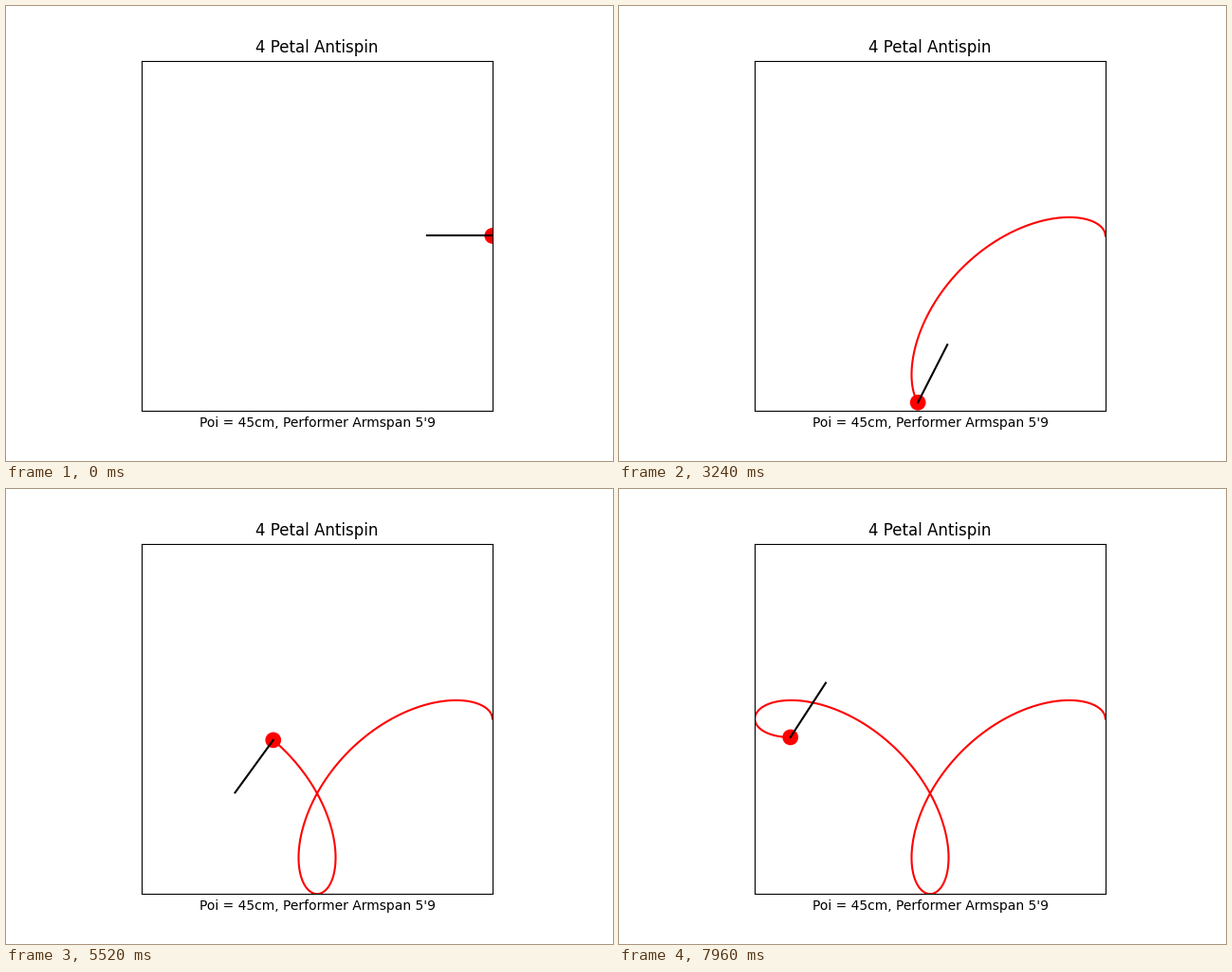
Recreate the animation shown at these times as a matplotlib script. Size 640 px wide and 480 px high, loop 8000 ms.

```python
import numpy as np
import matplotlib.pyplot as plt
from matplotlib.animation import FuncAnimation

ARM = 76.5       # hand circle radius, cm
POI = 45         # tether length, cm
REACH = ARM + POI
FRAMES = 200     # one degree of arm rotation per frame

theta = np.radians(np.arange(FRAMES))
hand_x, hand_y = ARM * np.cos(theta), -ARM * np.sin(theta)
head_x = hand_x + POI * np.cos(3 * theta)
head_y = hand_y + POI * np.sin(3 * theta)

fig, ax = plt.subplots(figsize=(6.4, 4.8), dpi=100)
ax.set_aspect("equal")
ax.set_xlim(-REACH, REACH)
ax.set_ylim(-REACH, REACH)
ax.set_xticks([])
ax.set_yticks([])
ax.set_title("4 Petal Antispin")
ax.set_xlabel("Poi = 45cm, Performer Armspan 5'9")

head = ax.add_patch(plt.Circle((REACH, 0), 5.5, facecolor="red", linewidth=0))
trail, = ax.plot([], [], color="red", lw=1.5)
tether, = ax.plot([], [], color="black", lw=1.5)


def draw(i):
    trail.set_data(head_x[:i + 1], head_y[:i + 1])
    tether.set_data([hand_x[i], head_x[i]], [hand_y[i], head_y[i]])
    head.center = head_x[i], head_y[i]
    return head, trail, tether


anim = FuncAnimation(fig, draw, frames=FRAMES, interval=40,
                     repeat=True, repeat_delay=0)
plt.show()
```
